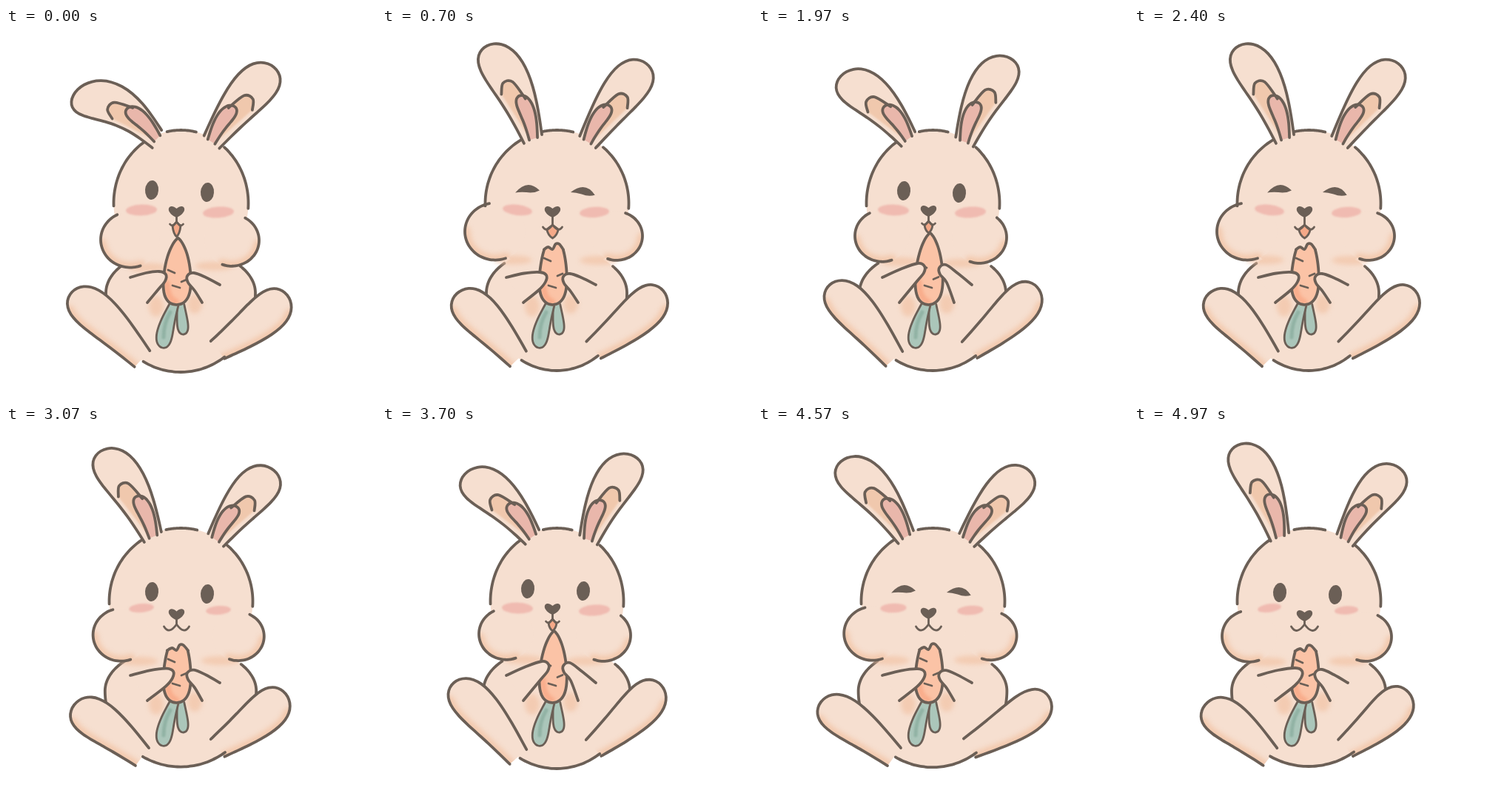
An HTML page that plays this animation: 500 px wide and 500 px high, repeating every 5130 ms.

```html
<!DOCTYPE html>
<html lang="en">
<head>
<meta charset="utf-8">
<title>Rabbit with a carrot</title>
<style>
html, body { margin: 0; width: 100%; height: 100%; overflow: hidden; background: #fff; }
svg { display: block; width: 100vw; height: 100vh; }
.pose { display: none; stroke-linecap: round; stroke-linejoin: round; }
.pose.on { display: inline; }
.line { fill: none; stroke: #6b5f56; stroke-width: 3.8; }
.thin { fill: none; stroke: #6b5f56; stroke-width: 2.8; }
.skin { fill: #f6dfd0; }
.dark { fill: #6b5f56; }
.shade { fill: #f0c8ad; filter: blur(1px); }
.soft { fill: none; stroke: #f2c3a4; stroke-width: 15; opacity: .75; filter: blur(3px); }
.glow { fill: #f2c5a8; opacity: .75; filter: blur(3px); }
.pink { fill: #e9b7ab; }
.blush { fill: #f0bbb1; filter: blur(1px); }
.carrot { fill: #fbc3a6; }
.ember { fill: none; stroke: #f8a582; stroke-width: 8; opacity: .75; filter: blur(2px); }
.tongue { fill: #f5a988; }
.leaf { fill: #abc6ba; }
.vein { fill: none; stroke: #86aa9b; stroke-width: 5; opacity: .7; filter: blur(1px); }
</style>
</head>
<body>
<svg id="stage" viewBox="0 0 500 500"></svg>
<script>
// ears: tip x, y, bend; cheeks: centre x, y, radius; toes: tip of each foot, left then right.
const reach = {
  ears: [[91, 91, 15], [362, 53, 4]], gap: 37, head: 91,
  cheeks: [[168, 286, 40], [305, 287, 37]], body: [101, 465], toes: [[89, 357], [380, 361]],
  eyes: 219, shut: 0, blush: [21, -2], nose: 248, lip: 262, smile: 9, tongue: 20,
  hand: [216, 337], tip: 284, cut: 0
};
const nibble = {
  ears: [[112, 65, 8], [341, 41, 7]], gap: 38, head: 90,
  cheeks: [[168, 281, 37], [299, 283, 37]], body: [99, 463], toes: [[97, 347], [377, 350]],
  eyes: 220, shut: 0, blush: [21, 2], nose: 247, lip: 261, smile: 9, tongue: 16,
  hand: [225, 326], tip: 277, cut: 0
};
const bite = {
  ears: [[142, 24, 7], [357, 48, 3]], gap: 37, head: 97,
  cheeks: [[153, 275, 41], [317, 281, 35]], body: [95, 463], toes: [[101, 359], [380, 355]],
  eyes: 220, shut: 1, blush: [20, 7], nose: 248, lip: 266, smile: 13, tongue: 18,
  hand: [222, 338], tip: 275, cut: 296
};
const chew = {
  ears: [[140, 26, 7], [359, 57, 5]], gap: 44, head: 97,
  cheeks: [[156, 284, 37], [313, 285, 35]], body: [104, 460], toes: [[96, 377], [371, 360]],
  eyes: 225, shut: 0, blush: [16, -8], nose: 256, lip: 268, smile: 18, tongue: 0,
  hand: [227, 335], tip: 276, cut: 301
};

const mix = (a, b, t) => Array.isArray(a) ? a.map((v, i) => mix(v, b[i], t))
  : typeof a === 'object' ? Object.fromEntries(Object.keys(a).map(k => [k, mix(a[k], b[k], t)]))
  : a + (b - a) * t;

const munch = { shut: 1, lip: 268, smile: 17, tongue: 0 };
const poses = [
  reach,
  nibble,
  { ...mix(nibble, bite, .6), shut: 1, ears: [[152, 19, 7], [350, 44, 5]], body: [97, 465], tip: 275, cut: 296 },
  bite,
  { ...mix(bite, chew, .3), ...munch, ears: [[118, 44, 8], [364, 56, 4]], toes: [[90, 366], [385, 360]] },
  { ...mix(bite, chew, .6), ...munch, ears: [[112, 48, 8], [366, 60, 4]], toes: [[85, 373], [393, 366]] },
  { ...mix(bite, chew, .8), ...munch, shut: 0, ears: [[128, 34, 7], [362, 60, 4]], toes: [[92, 377], [378, 362]] },
  chew
];

// Smooth curve through points.
function curve(pts) {
  const at = i => pts[Math.max(0, Math.min(pts.length - 1, i))];
  let d = 'M' + pts[0];
  for (let i = 0; i < pts.length - 1; i++) {
    const [a, b, c, e] = [at(i - 1), at(i), at(i + 1), at(i + 2)];
    d += `C${[0, 1].map(k => b[k] + (c[k] - a[k]) / 6)} ${[0, 1].map(k => c[k] - (e[k] - b[k]) / 6)} ${c}`;
  }
  return d;
}

const range = (n, f) => Array.from({ length: n + 1 }, (_, i) => f(i / n));

// Arc from angle a to b in degrees, 0 to the right and 90 down; up is the radius above the centre.
const arc = (x, y, rx, ry, a, b, up = ry) => range(24, t => {
  const w = (a + (b - a) * t) * Math.PI / 180, s = Math.sin(w);
  return [x + rx * Math.cos(w), y + s * (s > 0 ? ry : up)];
});

// Maps (share of the length, share of the width) onto a bent axis; side 1 leans left, -1 right.
function axis([x, y], [tx, ty], w, bend, side) {
  const dx = tx - x, dy = ty - y, len = Math.hypot(dx, dy);
  return (u, n) => {
    const off = side * (bend * Math.sin(Math.PI * u) + n * w) / len;
    return [x + dx * u - dy * off, y + dy * u + dx * off];
  };
}

// Rounded outline that widens from its open base; k is the width at the base.
const petal = (at, k) => range(20, t => {
  const u = Math.sin(Math.PI * t);
  return at(u, Math.sign(t - .5) * (k + (1.17 - k) * u) * Math.sqrt(Math.max(0, 1 - u ** 5)));
});

const path = (cls, d) => `<path class="${cls}" d="${d}"/>`;
const line = (...runs) => runs.map(r => path('line', curve(r))).join('');
const fill = (cls, pts) => path(cls, curve(pts) + 'Z');
const oval = (cls, x, y, rx, ry, tilt = 0) =>
  `<ellipse class="${cls}" cx="${x}" cy="${y}" rx="${rx}" ry="${ry}" transform="rotate(${tilt} ${x} ${y})"/>`;

let clips = 0;
function shaded(shape, edge) {
  const id = 'clip' + clips++;
  return `<clipPath id="${id}">${path('', curve(shape) + 'Z')}</clipPath>` + fill('skin', shape) +
    `<g clip-path="url(#${id})">${path('soft', curve(edge))}</g>`;
}

function ear([tx, ty, bend], gap, side) {
  const at = axis([241 - side * gap, 152 - side * 2], [tx, ty], 32, bend, side);
  const shell = petal(at, .42);
  const fold = [at(.52, -.58), at(.61, -.3), at(.58, .08), at(.38, .26)];
  const inner = petal(axis(at(0, .02), at(.43, .1), 11.5, 3, side), .5);
  return fill('skin', shell) + path('shade', curve(fold) + 'L' + at(.08, -.2) + 'Z') +
    fill('pink', inner) + line(shell, fold, inner);
}

function foot(toe, side) {
  const base = side > 0 ? [184, 447] : [286, 435];
  const shape = petal(axis(base, toe, 30, 3 * side, side), .5);
  return shaded(shape, shape.slice(0, 8)) + line(shape);
}

function cheek([x, y, r], head, side) {
  const reachX = Math.min(1, Math.abs(236.5 - side * head - x) / r);
  const top = Math.acos(reachX) * 180 / Math.PI + 8;
  const turn = a => side > 0 ? 180 + a : -a;
  const edge = arc(x, y, r, r * .94, turn(top), turn(-110));
  return oval('glow', x + side * 24, y + r * .94, 26, 6) +
    shaded(arc(x, y, r, r * .94, 0, 360), edge.slice(10)) + line(edge);
}

function arm([x, y], side) {
  const [ex, ey] = side > 0 ? [168, 337] : [289, 347];
  const [wx, wy] = side > 0 ? [191, 371] : [265, 371];
  const pts = [[ex, ey], [(ex + x) / 2 - 3 * side, (ey + y) / 2 - 6], [x - 9 * side, y - 8],
    [x, y - 4], [x - side, y + 5], [x - 10 * side, y + 16], [wx, wy]];
  return fill('skin', pts) + line(pts);
}

function eye(x, y, shut, tilt) {
  const lid = 'M-17 2Q0-17 16 0Q8 4-2 2Q-10 1-17 2Z';
  return shut ? `<g transform="translate(${x} ${y}) rotate(${tilt})">${path('dark', lid)}</g>`
    : oval('dark', x, y, 9, 13, 4);
}

function mouth({ nose, lip, smile, tongue }) {
  const x = 230.5, w = smile * .6;
  const heart = `M${x} ${nose + 8}C${x - 18} ${nose} ${x - 10} ${nose - 13} ${x} ${nose - 4}` +
    `C${x + 10} ${nose - 13} ${x + 18} ${nose} ${x} ${nose + 8}Z`;
  const flap = `M${x} ${lip}L${x - w} ${lip + 6}Q${x - w * .8} ${lip + tongue * .8} ${x} ${lip + tongue}` +
    `Q${x + w * .8} ${lip + tongue * .8} ${x + w} ${lip + 6}Z`;
  const dip = lip + smile * .85;
  return (tongue ? path('tongue', flap) + path('thin', flap) : '') +
    path('dark', heart) + path('thin', `M${x} ${nose}V${lip}`) +
    path('thin', `M${x - smile} ${lip + 3}Q${x - w} ${dip} ${x} ${lip}Q${x + w} ${dip} ${x + smile} ${lip + 3}`);
}

function carrot({ tip, cut }) {
  const x = 230.5, low = 374, end = cut ? (low - cut - 3) / (low - tip) : 1;
  const half = t => 19.5 * (1 - t ** 3) ** .75 * Math.sqrt(1 - (1 - t) ** 8);
  const edge = side => range(14, s => {
    const t = end * (1 - Math.cos(Math.PI * s)) / 2;
    return [x + side * half(t) + 2 * t, low - t * (low - tip)];
  });
  const teeth = cut ? [[-6, 0], [0, 3], [4, -4], [9, -4]].map(([dx, dy]) => [x + dx, cut + dy]) : [];
  const left = edge(-1), root = [...left, ...teeth, ...edge(1).reverse()];
  const long = petal(axis([227, low], [211, low + 58], 12, 2, 1), .5);
  const short = petal(axis([236, low], [240, low + 40], 8, 0, 1), .6);
  const top = cut || tip + 28, mid = (top + low) / 2;
  const marks = `M219 ${top + 15}l9 4M237 ${mid}l7 -3M225 ${low - 26}l10 3`;
  return [short, long].map(l => fill('leaf', l) + path('thin', curve(l))).join('') +
    path('vein', `M222 ${low + 10}Q213 ${low + 25} 213 ${low + 44}`) +
    fill('carrot', root) + path('ember', curve(left.slice(1, 6).map(([a, b]) => [a + 5, b - 3]))) +
    path('line', curve(root) + 'Z') + path('thin', marks);
}

function draw(p) {
  const [girth, seat] = p.body, [gripX, gripY] = p.hand, [size, tilt] = p.blush;
  const torso = (a, b) => arc(236, 358, girth, seat - 358, a, b, 60);
  const skull = (a, b) => arc(236.5, 237, p.head, 99, a - 90, b - 90);
  return `<g class="pose">` +
    fill('skin', torso(0, 360)) + line(torso(150, 222), torso(30, -37)) +
    foot(p.toes[0], 1) + foot(p.toes[1], -1) + line(torso(120, 54)) +
    fill('skin', skull(0, 360)) +
    cheek(p.cheeks[0], p.head, 1) + cheek(p.cheeks[1], p.head, -1) +
    line(skull(-12, 13), skull(-29, -92), skull(40, 94)) +
    ear(p.ears[0], p.gap, 1) + ear(p.ears[1], p.gap, -1) +
    oval('blush', 183, 246, size, size * .36, tilt) + oval('blush', 287, 249, size, size * .36, -4) +
    eye(197, p.eyes, p.shut, -2) + eye(272, p.eyes + 3, p.shut, 10) + mouth(p) +
    oval('glow', 203, 376, 10, 14) + oval('glow', 255, 373, 10, 13) +
    carrot(p) + arm([gripX, gripY], 1) + arm([245, gripY + 2], -1) +
    `</g>`;
}

const stage = document.getElementById('stage');
stage.innerHTML = poses.map(draw).join('');
const groups = [...stage.children];

// Three rounds that differ only in how long the reach, the bite and the last chew are held.
const holds = [[270, 230, 200], [240, 270, 200], [230, 240, 160]]
  .flatMap(([first, fourth, last]) => [first, 230, 200, fourth, 200, 200, 200, last]);
const loop = holds.reduce((sum, h) => sum + h, 0);
const start = performance.now();
let shown = -1;

function tick() {
  let t = (performance.now() - start) % loop, i = 0;
  while (t >= holds[i]) t -= holds[i++];
  const now = i % poses.length;
  if (now !== shown) {
    groups.forEach((g, k) => g.classList.toggle('on', k === now));
    shown = now;
  }
  requestAnimationFrame(tick);
}
tick();
</script>
</body>
</html>
```
